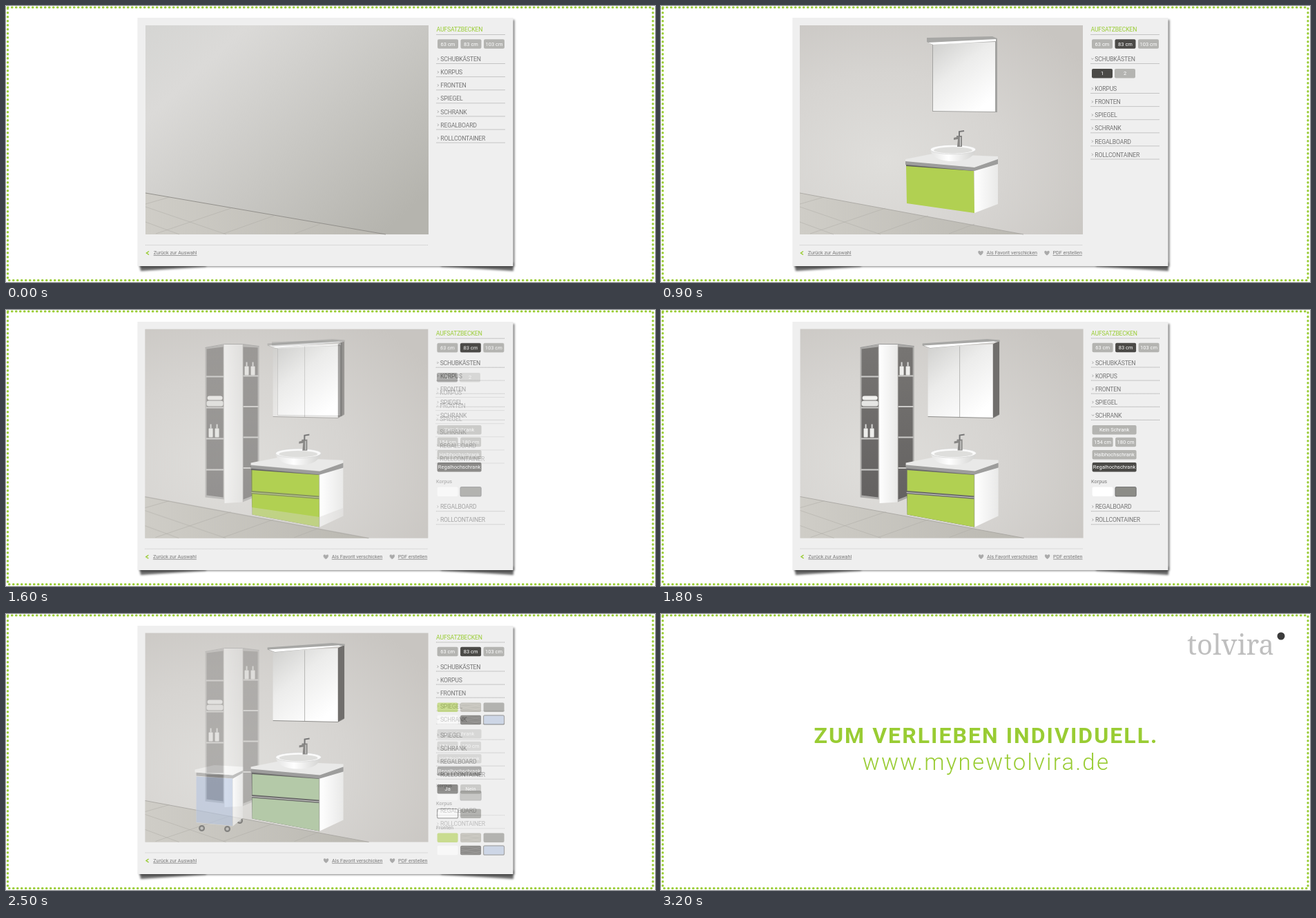
An HTML page for the animation above (5.2 s loop, 940 by 400 pixels).

```html
<!DOCTYPE html>
<html lang="de">
<head>
<meta charset="utf-8">
<title>Badmöbel</title>
<style>
html, body { margin: 0; width: 100%; height: 100%; overflow: hidden; background: #fff; }
svg { display: block; font-family: Roboto, "Open Sans", sans-serif; }
.head { font-size: 8.7px; letter-spacing: -.2px; fill: #747474; }
.small { font-size: 7.3px; fill: #777; }
.link { font-size: 7.2px; fill: #777; text-decoration: underline; }
.btn { font-size: 7.5px; fill: #fff; text-anchor: middle; }
.rule { stroke: #999; stroke-dasharray: 1 1; }
.end { fill: #9c3; text-anchor: middle; }
</style>
</head>
<body>
<svg id="stage" width="940" height="400" viewBox="0 0 940 400">
<defs>
  <linearGradient id="bare" x2="1" y2=".8">
    <stop stop-color="#d5d5d3"/><stop offset=".22" stop-color="#dbdad8"/><stop offset="1" stop-color="#b5b4ae"/>
  </linearGradient>
  <radialGradient id="wall" cx=".3" cy=".65" r=".85">
    <stop stop-color="#dfdedb"/><stop offset=".5" stop-color="#d6d4d1"/><stop offset="1" stop-color="#c8c5c1"/>
  </radialGradient>
  <linearGradient id="floor"><stop stop-color="#cfcdc7"/><stop offset="1" stop-color="#bab8b1"/></linearGradient>
  <linearGradient id="glass" x2=".7" y2="1">
    <stop stop-color="#cfcfcd"/><stop offset=".45" stop-color="#ececeb"/><stop offset="1" stop-color="#fff"/>
  </linearGradient>
  <linearGradient id="white"><stop stop-color="#fff"/><stop offset="1" stop-color="#e9e9e8"/></linearGradient>
  <linearGradient id="bowl"><stop stop-color="#e4e4e3"/><stop offset=".4" stop-color="#fff"/><stop offset="1" stop-color="#d2d2d0"/></linearGradient>
  <linearGradient id="dark" x2="0" y2="1"><stop stop-color="#777573"/><stop offset="1" stop-color="#646261"/></linearGradient>
  <filter id="soft"><feGaussianBlur stdDeviation="1.4"/></filter>
</defs>
</svg>
<script>
const LOOP = 5200, END = 3200, GREEN = '#b1d052', BLUE = '#b7c6e1';

const poly = (points, fill) => `<path d="M${points}Z" fill="${fill}"/>`;
const line = (points, color, width = 1) => `<path d="M${points}" fill="none" stroke="${color}" stroke-width="${width}"/>`;
const box = (x, y, w, h, fill, r = 0, extra = '') =>
  `<rect x="${x}" y="${y}" width="${w}" height="${h}" rx="${r}" fill="${fill}" ${extra}/>`;
const text = (x, y, cls, str, extra = '') => `<text x="${x}" y="${y}" class="${cls}" ${extra}>${str}</text>`;

// ---- side menu ----
const rule = y => `<path class="rule" d="M622.5 ${y}H722.5"/>`;
const row = (y, label, open) =>
  line(open ? `623.4 ${y - 1.2}l1.6 1.6 1.6 -1.6` : `624 ${y - 1.8}l1.6 1.6 -1.6 1.6`, '#999', .9) +
  text(628.3, y + 3.1, 'head', label) + rule(y + 6.5);
const rows = (y, ...labels) => labels.map((label, i) => row(y + 19.1 * i, label)).join('');
const btn = (x, y, label, on, w = 30) =>
  box(x, y, w, 13.4, on ? '#4b4a47' : '#b4b4b1', 2) + text(x + w / 2, y + 9.4, 'btn', label);
const sizes = on => text(622.5, 37.3, 'head', 'AUFSATZBECKEN', 'style="fill:#9c3"') + rule(41.5) +
  ['63 cm', '83 cm', '103 cm'].map((s, i) => btn(624 + 33.5 * i, 48.3, s, on && i === 1)).join('');

const swatch = (x, y, fill, on) =>
  box(x, y, 30, 13.4, fill, 2, on ? 'stroke="#777" stroke-width="1.2"' : '');
function wood(x, y, fill, grain) {
  let s = swatch(x, y, fill);
  for (let i = 0; i < 4; i++)
    s += line(`${x + 1} ${y + 2.5 + 3 * i}q7 ${i % 2 ? 2 : -2} 14 0t14 0`, grain, .6);
  return s;
}
const palette = y =>
  swatch(624, y, GREEN) + wood(657.5, y, '#a9a69b', '#c4c1b6') + swatch(691, y, '#8c8c87') +
  swatch(624, y + 18.3, '#fff') + wood(657.5, y + 18.3, '#4d4b48', '#73716d') + swatch(691, y + 18.3, BLUE, true);

// ---- room ----
const room = (wall, edge, seam) =>
  box(201, 28, 410, 303, `url(#${wall})`) + poly(`201 271L${edge} 331H201`, 'url(#floor)') +
  line(`201 271L${edge} 331`, seam, .9) +
  ['201 291L318 331', '201 313L250 331', '216 330L325 293', '314 330L387 304', '417 330L454 316', '201 287L236 277']
    .map(p => line(p, '#adaba5', .5)).join('');

const mirror =
  poly('393 54L487 48V154L393 153', '#a3a3a1') + poly('394 55L484 52V153L394 152', 'url(#glass)') +
  poly('385 46L480 44 487 47V50L393 56 385 52', '#a7a7a5') + poly('387 53L485 48V51L394 56', '#fff');

const mirrorCabinet =
  poly('480 50L489.5 45V152L480 157', '#706e6c') + poly('386 54L480 50V157L386 155', 'url(#glass)') +
  line('432 53V156', '#b5b5b3', 1) + line('386 155L480 157 489 152', '#858482', .9) +
  poly('378 49L472 42.5 490 44V46.5L389 56 378 52', '#a7a7a5') + poly('380 52L481 46 487 47 389 55.5', '#fff');

const basin =
  poly('354 222L394 214 488 218V223L454 234 354 226', '#e9e9e8') +
  poly('354 225L454 234 488 222V229L454 239 354 230', '#9d9d9c') +
  poly('390 208C392 218 401 225 423 225S453 218 456 208', 'url(#bowl)') +
  '<ellipse cx="423" cy="208" rx="33" ry="6.8" fill="#fafafa" stroke="#d5d5d3" stroke-width=".8"/>' +
  '<ellipse cx="423" cy="209" rx="28" ry="4.7" fill="#dededc"/>' +
  poly('428 188H436V204H429L430 193 424 194V191L428 190', '#888785') +
  line('432 189V182L439 181', '#777', 2) + line('433.5 190V203', '#d9d9d8', 1.2);

const singleUnit =
  poly('454 238L488 228V287L454 300', 'url(#white)') + poly('355 229L453 237V241L355 233', '#5d5d5b') +
  poly('355 232L453 239 454 300 356 286', GREEN) + basin;

const doubleUnit = front =>
  poly('454 238L488 228V299L454 315', 'url(#white)') +
  poly('355 229L453 237V315L356 297', '#6a6a69') +
  poly('356 232.5L453 239.5V270L356 262.5', front) + poly('356 267L453 274.5V315L356 297', front) +
  line('355 265L453 272.5', '#cfcfcd', 1.2) + basin;

const bottles = (x, y) => [0, 9].map(d =>
  box(x + d, y + 6, 6, 13, '#eeeeec', 1) + box(x + d + 2, y, 2, 6, '#d8d8d6')).join('');

function tallCabinet() {
  let s = poly('288 55L315 51V275L288 272', '#aaa9a7') + poly('290 57L314 54V272L290 269', 'url(#dark)') +
    poly('342 50L366 53V269L342 279', '#aaa9a7') + poly('343 54L364 55V267L343 275', 'url(#dark)');
  for (let i = 0; i < 4; i++)
    s += line(`289 ${97 + 45 * i}H315M343 ${96 + 44.5 * i}H365`, '#cccbc9', 2);
  return s + poly('315 50.5L342 50V279L316 280.5', 'url(#white)') + line('288 55L316 50H342L366 53', '#999', 1) +
    box(291, 125, 22, 6, '#f1f1ef', 3) + box(290, 132, 24, 8, '#e6e6e4', 3) +
    bottles(293, 166) + bottles(345, 76);
}

const wheel = (x, y) => `<circle cx="${x}" cy="${y}" r="3.4" fill="#bbb" stroke="#555" stroke-width="2.2"/>`;
const container =
  wheel(338, 300) + poly('328 236L342.5 229V296L328 308', 'url(#white)') +
  poly('275 230L328 233V308L275 303', '#e4e4e3') + poly('275 230L328 234 342 226V231L328 239 275 235', '#9d9d9c') +
  poly('275 236L327.5 239V307.5L275 302.5', BLUE) +
  poly('273 226L301 219.5 343 222V227L328 234 273 230', '#f6f6f5') + wheel(283, 311) + wheel(320, 312);

// ---- panel ----
const panel =
  box(180, 10, 570, 382, '#fff') +
  `<g filter="url(#soft)">
    <path d="M193 372H290V378Q240 381 195 384Z" fill="#000" opacity=".6"/>
    <path d="M630 372H735V384Q690 381 630 378Z" fill="#000" opacity=".6"/>
    <path d="M193 20H736.5V378H193Z" fill="#000" opacity=".5"/>
  </g>` + box(190.5, 17, 544, 360, '#efefef');

const heart = x => `<path transform="translate(${x} 355.5)" d="M0 6C-7 1-2.5-3 0 .5C2.5-3 7 1 0 6Z" fill="#aaa"/>`;
const footer = share =>
  '<path class="rule" d="M201 346.5H611" opacity=".5"/>' + line('206 355.5L202.5 358 206 360.5', '#9c3', 1.5) +
  text(212.7, 360.3, 'link', 'Zurück zur Auswahl') +
  (share ? heart(463) + text(471.5, 360.3, 'link', 'Als Favorit verschicken') +
    heart(559) + text(567.5, 360.3, 'link', 'PDF erstellen') : '');

const scene = (dx, dy, picture, menu, share = true) =>
  `<g>${panel}<g transform="translate(${dx} ${dy})">${picture}${menu}${footer(share)}</g></g>`;

const furnished = room('wall', 525, '#aaa8a3');
const scenes = [
  scene(1, 0, room('bare', 549, '#8d8b86'), sizes(false) +
    rows(77, 'SCHUBKÄSTEN', 'KORPUS', 'FRONTEN', 'SPIEGEL', 'SCHRANK', 'REGALBOARD', 'ROLLCONTAINER'), false),

  scene(0, 0, furnished + mirror + singleUnit, sizes(true) + row(77, 'SCHUBKÄSTEN', true) +
    btn(624, 91, '1', true) + btn(657, 91, '2') +
    rows(120, 'KORPUS', 'FRONTEN', 'SPIEGEL', 'SCHRANK', 'REGALBOARD', 'ROLLCONTAINER')),

  scene(.6, -.5, furnished + tallCabinet() + mirrorCabinet + doubleUnit(GREEN), sizes(true) +
    rows(77, 'SCHUBKÄSTEN', 'KORPUS', 'FRONTEN', 'SPIEGEL') + row(153.4, 'SCHRANK', true) +
    btn(624, 167.5, 'Kein Schrank', false, 64) + btn(624, 185.3, '154 cm') + btn(657.5, 185.3, '180 cm') +
    btn(624, 203.5, 'Halbhochschrank', false, 64) + btn(624, 221.5, 'Regalhochschrank', true, 64) +
    text(622.5, 251.3, 'small', 'Korpus') + swatch(624, 257, '#fff') + swatch(657.5, 257, '#8c8c87', true) +
    rows(285.7, 'REGALBOARD', 'ROLLCONTAINER')),

  scene(.6, -.5, furnished + container + mirrorCabinet + doubleUnit(BLUE), sizes(true) +
    rows(77, 'SCHUBKÄSTEN', 'KORPUS') + row(115.2, 'FRONTEN', true) + palette(129) +
    rows(176, 'SPIEGEL', 'SCHRANK', 'REGALBOARD') + row(233.3, 'ROLLCONTAINER', true) +
    btn(624, 247.5, 'Ja', true) + btn(657.5, 247.5, 'Nein') +
    text(622.5, 277.3, 'small', 'Korpus') + swatch(624, 283, '#fff', true) + swatch(657.5, 283, '#8c8c87') +
    text(622.5, 312.5, 'small', 'Fronten') + palette(318)),

  `<g>${box(0, 0, 940, 400, '#fff')}
    ${text(762, 59, '', 'tolvira', 'font-family="Noto Serif, serif" font-size="40" fill="#bfbfbf"')}
    <circle cx="898" cy="32" r="5.5" fill="#3c3c3c"/>
    ${text(471, 187, 'end', 'ZUM VERLIEBEN INDIVIDUELL.', 'font-size="32" font-weight="700" letter-spacing="2.05"')}
    ${text(471, 225.5, 'end', 'www.mynewtolvira.de', 'font-size="33" font-weight="300" letter-spacing="2.2"')}</g>`
];

const border = `<rect x="2.5" y="2" width="934.5" height="395.5" fill="none" stroke="#9c3"
  stroke-width="3.2" stroke-linecap="round" stroke-dasharray="0.5 5.5"/>`;

const stage = document.getElementById('stage');
stage.insertAdjacentHTML('beforeend', scenes.join('') + border);
const layers = [...stage.children].filter(el => el.tagName === 'g');

function draw() {
  const t = performance.now() % LOOP;
  for (let i = 1; i < 4; i++) {
    const step = Math.floor((t - 500 - 900 * (i - 1)) / 100) + 1;
    layers[i].setAttribute('opacity', Math.min(1, Math.max(0, step / 5)));
  }
  layers[4].setAttribute('opacity', t >= END ? 1 : 0);
  requestAnimationFrame(draw);
}
draw();
</script>
</body>
</html>
```
